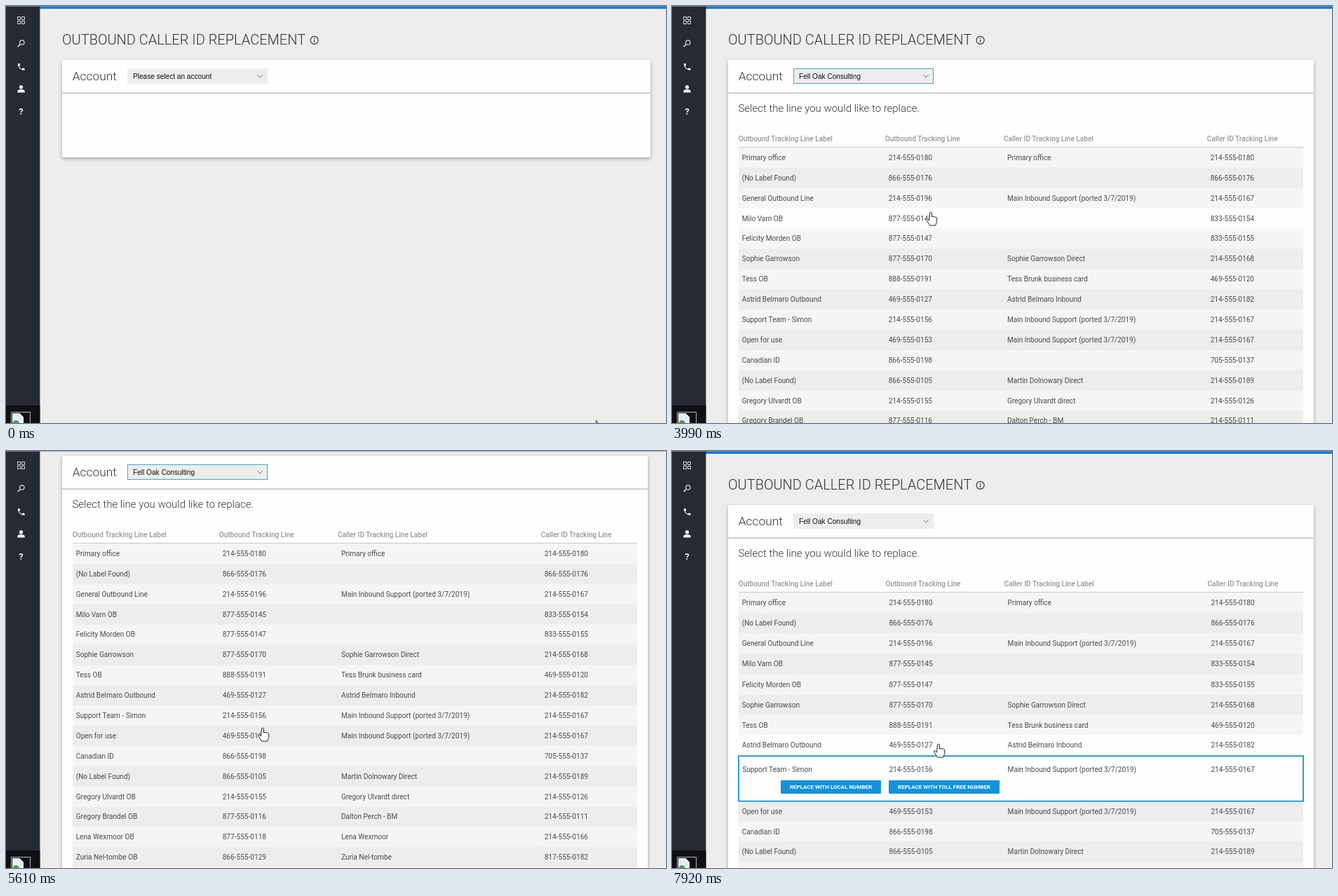
Recreate the animation shown at these times as an HTML page. Size 941x595 px, loop 8000 ms.

```html
<!DOCTYPE html>
<html lang="en">
<head>
<meta charset="utf-8">
<title>Outbound caller ID replacement</title>
<style>
  html, body { margin: 0; width: 100%; height: 100%; overflow: hidden; background: #ededed; }
  svg { display: block; width: 941px; height: 595px; font-family: Roboto, sans-serif; }
  .light { font-weight: 300; fill: #333; }
  .head { font-size: 10.08px; font-weight: 500; fill: #969696; }
  .cell { font-size: 10.1px; fill: #4a4a4a; }
  .field { font: 10.1px "Liberation Sans", Arial, sans-serif; fill: #111; }
  .button { font-size: 8px; font-weight: 700; fill: #fff; text-anchor: middle; }
  .card { filter: drop-shadow(0 2px 2.5px rgba(0, 0, 0, .32)); }
</style>
</head>
<body>
<svg id="stage" viewBox="0 0 941 595">
  <rect width="941" height="595" fill="#ededed"/>
  <g id="page">
    <rect x="48" width="893" height="4" fill="#0d7ade"/>
    <text class="light" x="80" y="54.7" font-size="20">OUTBOUND CALLER ID REPLACEMENT</text>
    <g fill="none" stroke="#333" stroke-width="1.2">
      <circle cx="439.6" cy="48.9" r="5.5"/>
      <path d="M439.6 48v4M439.6 45.6v1.3"/>
    </g>
    <rect id="card" class="card" x="80" y="77" rx="1.5" fill="#fefefe"/>
    <rect id="rule" x="80" y="123.4" height="1.6" fill="#c6c6c6"/>
    <text class="light" x="94.7" y="106" font-size="17.4">Account</text>
    <rect id="select" x="173.5" y="89.5" width="199" height="21" fill="#ededed"/>
    <text id="account" class="field" x="181" y="103.7"></text>
    <path d="M358.5 98.3l3.7 3.6 3.7-3.6" fill="none" stroke="#666"/>
    <g id="table">
      <text class="light" x="94.5" y="151" font-size="14.97">Select the line you would like to replace.</text>
      <g id="heads"></g>
      <rect id="headRule" x="95" y="201.3" height="1.4" fill="#b4b4b4"/>
    </g>
    <circle id="spinner" cx="499" cy="271" r="12.7" fill="none" stroke="#1fd6a0" stroke-width="2.6"
      pathLength="360" stroke-dasharray="82 53 54 58 60 53"/>
    <g id="rows"></g>
    <g id="open">
      <rect x="95" y=".8" width="805" height="64.4" fill="#fefefe" stroke="#1693d6" stroke-width="1.8"/>
      <g id="openText"></g>
      <rect x="155" y="35.4" width="143" height="19.3" rx="1.5" fill="#1593d9"/>
      <rect x="309" y="35.4" width="158" height="19.3" rx="1.5" fill="#1593d9"/>
      <text class="button" x="226.5" y="48">REPLACE WITH LOCAL NUMBER</text>
      <text class="button" x="388" y="48">REPLACE WITH TOLL FREE NUMBER</text>
    </g>
  </g>

  <rect width="48.4" height="595" fill="#262a33"/>
  <rect y="570" width="48.4" height="25" fill="#0e1014"/>
  <g fill="none" stroke="#d8d9db">
    <path d="M16.5 15.5h4v4h-4zM22.5 15.5h4v4h-4zM16.5 21.5h4v4h-4zM22.5 21.5h4v4h-4z"/>
    <circle cx="22.8" cy="52" r="3.2" stroke-width="1.2"/>
    <path d="M20.3 54.5l-3.6 3.6" stroke-width="1.6"/>
    <path d="M7.5 596V579.5h27V596" stroke="#b5b5b5"/>
  </g>
  <g fill="#ededed">
    <path transform="translate(15.2 80.4) scale(.54)" d="M6.6 10.8c1.4 2.8 3.8 5.1 6.6 6.6l2.2-2.2c.3-.3.7-.4 1-.2 1.1.4 2.3.6 3.6.6.6 0 1 .4 1 1V20c0 .6-.4 1-1 1C10.6 21 3 13.4 3 4c0-.6.4-1 1-1h3.5c.6 0 1 .4 1 1 0 1.300.2 2.500.6 3.600.1.300 0 .7-.2 1z"/>
    <circle cx="21.5" cy="115.7" r="2.7"/>
    <path d="M16.3 123.4v-1.500c0-2 2.600-2.800 5.200-2.800s5.200.8 5.200 2.800v1.500z"/>
    <text x="21.5" y="154.6" font-size="13" font-weight="700" text-anchor="middle">?</text>
  </g>
  <path d="M9.5 581.500h10l5 5V596h-15z" fill="#e4edf9" stroke="#f2f2f2"/>
  <path d="M10 595v-1.500q4-4.500 8-.5l1 2z" fill="#4d9a45"/>
  <path d="M19 595l6-6v6z" fill="#fff"/>
  <rect width="941" height="1" fill="#8e9298" opacity=".75"/>

  <g id="cursor" fill="#fff" stroke="#222" stroke-linejoin="round">
    <path id="arrow" d="M.5.5v16l3.7-3.4 2.5 5.6 2.3-1-2.5-5.5h5z"/>
    <path id="hand" d="M-1.5 1q1.5-2 3 0v6q1.2-1.3 2.5 0 1.2-1 2.4.3 1.600-.6 2.300.9v5.300l-2 5.600h-8l-5-7.600q-.8-2 1.300-1.800l2.500 2.300z"/>
  </g>
</svg>
<script>
const LOOP = 8000, STEP = 1000 / 13, ROW = 28.89, TOP = 202;
const TABLE_AT = 3450, PICK_AT = 1600;
const MAIN = 'Main Inbound Support (ported 3/7/2019)|21467';
// label | line | caller ID label | caller ID line; a line is area code plus last two digits
const DATA = `Primary office|21480|Primary office|21480
(No Label Found)|86676||86676
General Outbound Line|21496|${MAIN}
Milo Varn OB|87745||83354
Felicity Morden OB|87747||83355
Sophie Garrowson|87770|Sophie Garrowson Direct|21468
Tess OB|88891|Tess Brunk business card|46920
Astrid Belmaro Outbound|46927|Astrid Belmaro Inbound|21482
Support Team - Simon|21456|${MAIN}
Open for use|46953|${MAIN}
Canadian ID|86698||70537
(No Label Found)|86605|Martin Dolnowary Direct|21489
Gregory Ulvardt OB|21455|Gregory Ulvardt direct|21426
Gregory Brandel OB|87716|Dalton Perch - BM|21411
Lena Wexmoor OB|87718|Lena Wexmoor|21466
Zuria Nel-tombe OB|86629|Zuria Nel-tombe|81782
Monica Tarvel Outbound|21419|Monica Tarvel|40572
Tavion Hollen Outbound|46970|Tavion Hollen Inbound tracking line|21407
Extra OB # (originally provisioned for Corliss)|46905|Corliss Fortell Inbound|21485
Genevieve Palva Outbound|46928|Genevieve Palva Inbound|21493
Torben Lisk Outbound|46929|Torben Lisk Inbound|21402
Philippa Marsk Outbound|46952|Philippa Marsk Inbound|21416
(No Label Found)|87784|Bram test|85511
Benedict Hartlow Outbound|21403|Ben Hartlow Inbound|21421
Corliss Fortell OB|97260|Corliss Fortell Inbound|21485
Lola Montibar Outbound|56217|Lola Montibar Direct|56213
Marissa Corvelli Outbound|46931|Marissa Corvelli Inbound|21488
Nora Vale - OUTbound|46913|Nora Vale - Inbound|46910
Open for use|46944|${MAIN}`.split('\n').map(line => line.split('|').map((text, i) =>
  i % 2 ? `${text.slice(0, 3)}-555-01${text.slice(3)}` : text));
const HEADS = ['Outbound Tracking Line Label', 'Outbound Tracking Line',
  'Caller ID Tracking Line Label', 'Caller ID Tracking Line'];

// tracks: [time, ...values]
const CURSOR = [[0, 841, 591], [300, 765, 440], [620, 460, 190], [846, 338, 107], [1080, 338, 107],
  [1500, 300, 128], [1700, 300, 132], [2077, 284, 237], [2540, 284, 248], [3380, 282, 268],
  [3615, 368, 280], [3923, 368, 280], [4000, 369, 294], [4385, 366, 395], [5690, 366, 395],
  [6000, 366, 304], [6154, 366, 322], [6385, 371, 437], [6462, 373, 429], [6538, 373, 429],
  [6615, 379, 427], [6692, 379, 427], [7000, 376, 488], [7231, 376, 507], [7308, 376, 507],
  [7615, 379, 394], [7692, 378, 419], [7846, 378, 419], [7923, 380, 418]];
const SCROLL = [[4692, 0], [4769, 25], [4846, 90], [4923, 210], [5077, 395], [5154, 430],
  [5308, 430], [5385, 401], [5462, 300], [5615, 70], [5692, 0]];

function sample(track, t) {
  const next = track.findIndex(key => key[0] > t);
  if (next < 0) return track[track.length - 1].slice(1);
  if (next === 0) return track[0].slice(1);
  const a = track[next - 1], b = track[next], k = (t - a[0]) / (b[0] - a[0]);
  return a.slice(1).map((v, i) => Math.round(v + (b[i + 1] - v) * k));
}

const el = {};
document.querySelectorAll('[id]').forEach(node => el[node.id] = node);
function set(node, attrs) {
  for (const name in attrs) node.setAttribute(name, attrs[name]);
}
function add(parent, tag, attrs, text = '') {
  const node = document.createElementNS('http://www.w3.org/2000/svg', tag);
  set(node, attrs);
  node.textContent = text;
  return parent.appendChild(node);
}
const show = (node, on) => node.style.display = on ? '' : 'none';
const addCells = (parent, texts) => texts.map(text => add(parent, 'text', { class: 'cell' }, text));
const placeCells = (cells, cols, y) => cells.forEach((cell, i) => set(cell, { x: cols[i] + 4.7, y }));

const heads = HEADS.map(text => add(el.heads, 'text', { class: 'head', y: 193 }, text));
const rows = DATA.map(texts => ({
  band: add(el.rows, 'rect', { x: 95, width: 805, height: ROW + 1 }),
  cells: addCells(el.rows, texts)
}));
const openCells = addCells(el.openText, DATA[0]);

// an opened row pushes the ones below it down
function rowTop(i, open) {
  let shift = 0;
  if (open >= 0) shift = i > open ? 37.7 : i < 3 ? 0 : i === 3 ? .7 : 1.3;
  return TOP + ROW * i + shift;
}

function draw(now) {
  const t = Math.floor((now % LOOP + 14) / STEP) * STEP;
  const [x, y] = sample(CURSOR, t), [scroll] = sample(SCROLL, t);
  const picked = t >= PICK_AT, loaded = t >= TABLE_AT;
  const open = t >= 6980 ? 8 : t >= 6060 ? 3 : -1;
  const nudge = open < 0 ? 0 : .7;
  const cols = loaded ? [95, 304 + nudge, 473.2 + nudge, 763 + nudge] : [95, 325.3, 508.7, 729];
  const width = loaded ? 835 : 839;

  set(el.page, { transform: `translate(0 ${-scroll})` });
  set(el.card, { width, height: loaded ? 1100 : picked ? 234 : 139 });
  set(el.rule, { width });
  set(el.select, { stroke: t >= 910 && open < 0 ? '#48a6ce' : '#ededed' });
  el.account.textContent = picked ? 'Fell Oak Consulting' : 'Please select an account';

  show(el.table, picked);
  heads.forEach((head, i) => set(head, { x: cols[i] - .3 }));
  set(el.headRule, { width: loaded ? 805 : 808 });
  show(el.spinner, picked && !loaded);
  set(el.spinner, { transform: `rotate(${(t - 2077) * .36 - 112} 499 271)` });

  show(el.rows, loaded);
  // hover is only refreshed once scrolling has settled
  const hoverY = y + (t >= 5140 && t < 5680 ? 430 : 0);
  rows.forEach(({ band, cells }, i) => {
    const top = rowTop(i, open);
    const hover = hoverY >= top && hoverY < rowTop(i + 1, open);
    set(band, { y: top, fill: hover ? '#fefefe' : i % 2 ? '#ededee' : '#f5f5f4' });
    placeCells(cells, cols, Math.round(top + 17.9));
  });

  show(el.open, open >= 0);
  if (open >= 0) {
    set(el.open, { transform: `translate(0 ${rowTop(open, open)})` });
    openCells.forEach((cell, i) => cell.textContent = DATA[open][i]);
    placeCells(openCells, [95.5, ...cols.slice(1)], 24);
  }

  set(el.cursor, { transform: `translate(${x} ${y})` });
  show(el.arrow, !loaded);
  show(el.hand, loaded);
}

let start;
function tick(now) {
  start ??= now;
  draw(now - start);
  requestAnimationFrame(tick);
}
draw(0);
requestAnimationFrame(tick);
</script>
</body>
</html>
```
